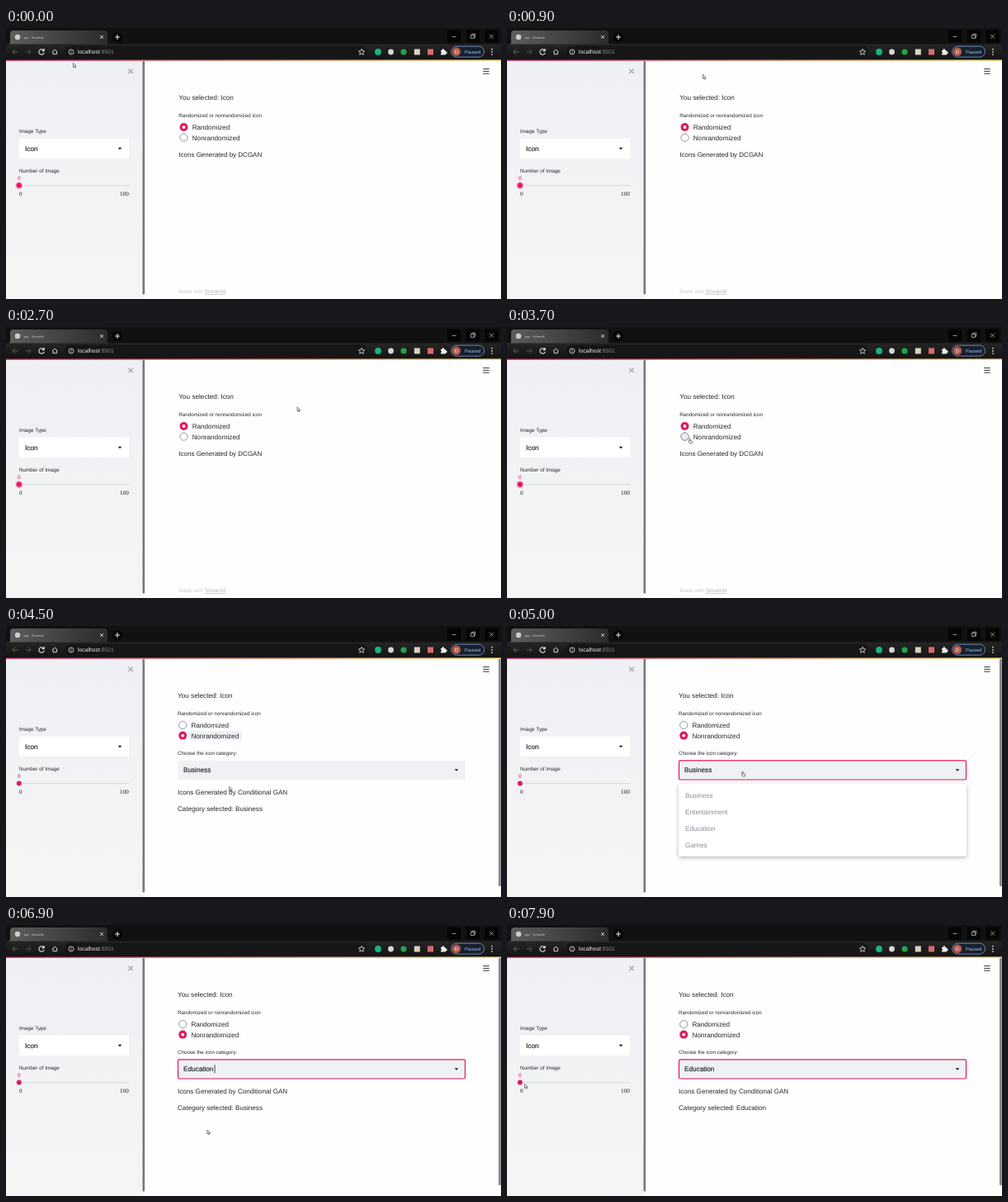
An HTML page that plays this animation: 600 by 328 pixels, repeating every 8 s.

```html
<!DOCTYPE html>
<html lang="en">
<head>
<meta charset="utf-8">
<title>Icon generator</title>
<style>
  html, body { margin: 0; width: 100%; height: 100%; overflow: hidden; background: #fff; }
  svg { display: block; width: 100vw; height: 100vh; }
  text { font-family: "Liberation Sans", Arial, sans-serif; text-rendering: geometricPrecision; white-space: pre; }
  .digits { font-family: "Noto Serif", serif; }
</style>
</head>
<body>
<svg id="stage" viewBox="0 0 600 328" xmlns="http://www.w3.org/2000/svg"></svg>
<script>
const LOOP = 8000;
const INK = '#262730', PINK = '#e0195f', PALE = '#eff1f4', LIGHT = '#e4e6e9';

const text = (x, y, str, size = 8.15, fill = INK, extra = '') =>
  `<text x="${x}" y="${y}" font-size="${size}" fill="${fill}" ${extra}>${str}</text>`;
const rect = (x, y, w, h, fill, extra = '') =>
  `<rect x="${x}" y="${y}" width="${w}" height="${h}" fill="${fill}" ${extra}/>`;
const circle = (x, y, r, fill, extra = '') =>
  `<circle cx="${x}" cy="${y}" r="${r}" fill="${fill}" ${extra}/>`;
const line = (d, color, width = 1, extra = '') =>
  `<path d="${d}" fill="none" stroke="${color}" stroke-width="${width}" ${extra}/>`;
const group = (id, body, extra = '') => `<g id="${id}" ${extra}>${body}</g>`;
const caretDown = (x, y) => `<path d="M${x - 2.3} ${y}h4.6l-2.3 2.5z" fill="#111"/>`;
const medium = 'stroke="#262730" stroke-width=".18"';
const gradient = (id, from, to, extra = '') =>
  `<linearGradient id="${id}" ${extra}><stop stop-color="${from}"/><stop offset="1" stop-color="${to}"/></linearGradient>`;
const vertical = 'x2="0" y2="1"';

const defs = '<defs>'
  + gradient('rainbow', '#c5104f', '#e8cf62')
  + gradient('side', '#eef0f4', '#f6f5f6', vertical)
  + gradient('tab', '#5e5e5e', '#2a2a2a')
  + gradient('bar', '#252525', '#131313', vertical)
  + '<filter id="shadow" x="-10%" y="-10%" width="120%" height="130%"><feDropShadow dx="0" dy="2" stdDeviation="2.5" flood-opacity=".28"/></filter></defs>';

function browserBar() {
  const tab = rect(0, 0, 600, 20, '#111')
    + '<path d="M2 20q3 0 3-3V7q0-4 4-4h110q4 0 4 4v10q0 3 3 3z" fill="url(#tab)"/>'
    + circle(14, 11, 3.2, '#c9cdd3')
    + text(21.5, 12.6, 'app · Streamlit', 3.7, '#c8cace')
    + line('M114 9l4 4m0-4l-4 4', '#d5d7da', .9)
    + circle(135, 11, 6, '#050505')
    + line('M132 11h6M135 8v6', '#e2e3e5', 1.1)
    + [543, 566, 588.5].map(x => rect(x - 8, 2.5, 16, 15, '#050505')).join('')
    + line('M540.5 10.5h5', '#ccc', .7)
    + line('M563.5 8.5h4v4h-4zM564.8 8.5v-1.3h4v4h-1.3', '#ccc', .7)
    + line('M586 7.7l5 5m0-5l-5 5', '#ccc', .7);
  const nav = rect(0, 19.5, 600, 19.5, 'url(#bar)')
    + rect(71, 21.5, 367, 14.5, '#161616', 'rx="7.25"')
    + line('M14.5 29h-6.5m3-3.2l-3.2 3.2 3.2 3.2', '#66686b', .9)
    + line('M23.5 29h6.5m-3-3.2l3.2 3.2-3.2 3.2', '#55575a', .9)
    + line('M45.6 27a3.2 3.2 0 1 0 .6 2.8M46.2 25v2.6h-2.6', LIGHT, 1.1)
    + line('M56 29l3.2-2.8 3.2 2.8M57 28.7v3h4.4v-3', LIGHT, .9)
    + circle(79, 29, 3, 'none', `stroke="${LIGHT}" stroke-width=".8"`)
    + line('M79 28.6v2M79 27v.8', LIGHT, .8)
    + text(87, 31.2, 'localhost<tspan fill="#85878b">:8501</tspan>', 6.8, '#f0f1f2')
    + line('M431 25.4l1.1 2.4 2.6.2-2 1.7.6 2.6-2.3-1.4-2.3 1.4.6-2.6-2-1.7 2.6-.2z', LIGHT, .8);
  const extensions = circle(451, 29, 3.9, '#18b57d')
    + circle(466.5, 29, 3.4, '#d5d7da')
    + circle(482, 29, 3.6, '#20a548')
    + rect(494.8, 25.5, 7, 7, '#d8d2c0')
    + rect(511, 25.5, 7, 7, '#dc6a6c')
    + '<path d="M527 27h1.6a1.3 1.3 0 1 1 2.4 0h1.8v1.8a1.3 1.3 0 1 1 0 2.4v1.4H527v-1.7a1.2 1.2 0 0 0 0-2.3z" fill="#eceded"/>';
  const profile = rect(539.6, 22.2, 40, 13, '#17202d', 'rx="6.5" stroke="#7f9ed0" stroke-width=".8"')
    + circle(546, 28.7, 5.2, '#b5594c')
    + text(546, 30.9, 'D', 6, '#fff', 'text-anchor="middle"')
    + text(556, 30.8, 'Paused', 5.7, '#9dbdf5')
    + [25.7, 28.9, 32.1].map(y => circle(589, y, .85, LIGHT)).join('');
  return tab + nav + extensions + profile + rect(0, 38.4, 600, 1.3, 'url(#rainbow)');
}

function sidebar() {
  return rect(0, 39, 167, 289, 'url(#side)')
    + rect(165.5, 40, 2.6, 282.5, '#77787b', 'rx="1"')
    + line('M148.3 49.7l5.4 5.4m0-5.4l-5.4 5.4', '#a9acb3', 1.4)
    + text(16, 127.3, 'Image Type', 6.3)
    + rect(16, 133.5, 133, 24.5, '#fff', 'rx="1"')
    + text(23, 148.7, 'Icon', 8.3, INK, medium) + caretDown(138, 144.8)
    + text(16, 175, 'Number of Image', 6.3)
    + text(15.8, 184.2, '0', 6.5, PINK, 'class="digits" text-anchor="middle"')
    + rect(16, 190, 133, 1.2, '#d9dce2')
    + circle(15.8, 190.6, 4.3, '#f29fbb', 'id="halo"')
    + circle(15.8, 190.6, 3, PINK)
    + text(16, 203, '0', 6.5, INK, 'class="digits"')
    + text(149, 203, '100', 6.5, INK, 'class="digits" text-anchor="end"');
}

const radioOff = y => circle(215.5, y, 4.6, '#fff', 'stroke="#8b8d95" stroke-width=".9"');
const radioOn = y => circle(215.5, y, 5, PINK) + circle(215.5, y, 1.9, '#fff');

function mainPage() {
  const shared = rect(223.5, 126.8, 64, 11.6, PALE, 'id="focus" rx="1"')
    + text(209.3, 87.4, 'You selected: Icon', 8.2)
    + text(209.3, 108, 'Randomized or nonrandomized icon', 6.28)
    + text(225.7, 123.1, 'Randomized', 8.15)
    + text(225.7, 135.7, 'Nonrandomized', 8.2)
    + group('first', radioOn(120) + radioOff(132.6)
      + circle(215.5, 132.6, 4.6, '#e9ecf2', 'id="hover" stroke="#8b8d9b" stroke-width=".9"'))
    + group('second', radioOff(120) + radioOn(132.6));
  const random = text(209.3, 156, 'Icons Generated by DCGAN', 8)
    + text(209.3, 321.3, 'Made with <tspan text-decoration="underline" fill="#b3b5be">Streamlit</tspan>', 6.5, '#c9cbd1');
  const conditional = text(208, 156, 'Choose the icon category:', 6.23)
    + rect(208.5, 162.8, 348, 23.2, PALE, 'id="select" rx="1.5" stroke-width="1.2"')
    + text(215, 177.3, '', 8.2, INK, 'id="choice" ' + medium)
    + line('M253 169.3v10', '#111', .8, 'id="caret"')
    + caretDown(546, 173.3)
    + text(208, 203.9, 'Icons Generated by Conditional GAN', 8.1)
    + text(208, 224.1, '', 8.13, INK, 'id="category"')
    + rect(597, 40, 2.8, 275, '#85868a', 'rx="1"');
  const options = ['Business', 'Entertainment', 'Education', 'Games']
    .map((name, i) => text(216, 207.6 + i * 20, name, 8.25, '#8b8d95')).join('');
  return rect(167, 39, 433, 289, '#fefefe')
    + line('M578.3 49.6h7.4m-7.4 2.8h7.4m-7.4 2.8h7.4', '#333')
    + group('shared', shared) + group('random', random) + group('conditional', conditional)
    + group('menu', rect(208, 191, 349, 87.5, '#fff', 'rx="1.5" filter="url(#shadow)"') + options);
}

const outline = 'fill="#fff" stroke="#333" stroke-width=".65"';
const cursor = group('arrow', `<path d="M0 0v5l1.2-1 .8 1.7.8-.4-.8-1.6h1.6z" ${outline}/>`)
  + group('hand', `<path d="M.2.5q.6-.8 1 0v2.1l2.1.5q.6.2.5.9L3.4 6H.9L-.8 3.7q0-.7 1 0z" ${outline}/>`);

document.getElementById('stage').innerHTML = defs + mainPage() + sidebar() + browserBar() + group('cursor', cursor);
const el = id => document.getElementById(id);
const show = (id, on) => el(id).setAttribute('visibility', on ? 'inherit' : 'hidden');

// Pointer stops: time, x, y
const path = [
  [0, 81.5, 42.5], [300, 81.5, 42.5], [1600, 433.3, 74], [2200, 433.3, 74],
  [3400, 220.8, 134.8], [4050, 220.8, 134.8], [4500, 270.8, 194.5],
  [4850, 285, 176], [5150, 285, 176], [5700, 251.8, 250.5], [6400, 244, 248],
  [7250, 244, 248], [7850, 21.5, 192.5], [8000, 21.5, 192.5]
];

function pointerAt(t) {
  const i = path.findIndex(p => p[0] > t);
  const [t0, x0, y0] = path[i - 1], [t1, x1, y1] = path[i];
  const p = (t - t0) / (t1 - t0), e = p * p * (3 - 2 * p);
  return [x0 + (x1 - x0) * e, y0 + (y1 - y0) * e];
}

function draw(t) {
  const clicked = t >= 4000, loaded = t >= 4200;
  const opened = t >= 5000, picked = t >= 6500;
  const [x, y] = pointerAt(t);

  show('halo', !clicked);
  show('first', !clicked);
  show('second', clicked);
  show('hover', t >= 3300 && !clicked);
  show('focus', clicked && !opened);
  show('random', !loaded);
  show('conditional', loaded);
  el('shared').setAttribute('transform', `translate(${loaded ? -1.3 : 0})`);

  show('menu', opened && !picked);
  show('caret', picked && t < 7100);
  el('select').setAttribute('stroke', opened ? PINK : 'none');
  el('choice').textContent = picked ? 'Education' : 'Business';
  el('category').textContent = 'Category selected: ' + (t >= 7200 ? 'Education' : 'Business');

  const pointing = (t >= 3300 && t < 4150) || (t >= 4800 && !picked);
  show('hand', pointing);
  show('arrow', !pointing);
  el('cursor').setAttribute('transform', `translate(${x} ${y})`);
}

const start = performance.now();
function tick() {
  draw((performance.now() - start) % LOOP);
  requestAnimationFrame(tick);
}
tick();
</script>
</body>
</html>
```
